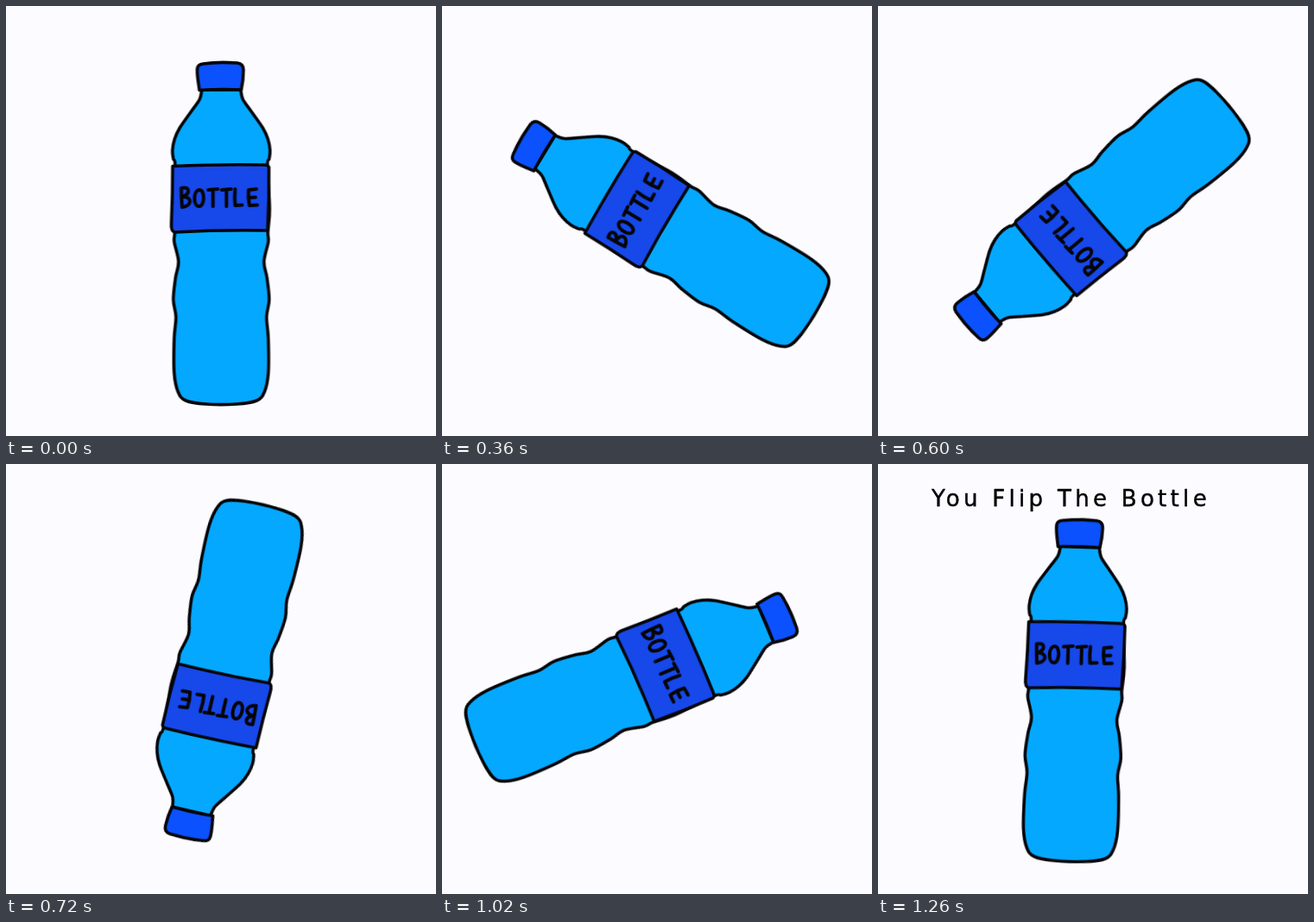
Write an HTML page that moves like this. It is 498x498 px and loops after 1320 ms.

```html
<!DOCTYPE html>
<html lang="en">
<head>
<meta charset="utf-8">
<title>Bottle flip</title>
<style>
  html, body { margin: 0; width: 100%; height: 100%; overflow: hidden; background: #fcfbff; }
  svg { display: block; width: 100vw; height: 100vh; }
  path { stroke: #050508; stroke-width: 3.6; stroke-linecap: round; stroke-linejoin: round; }
  #letters path { fill: none; stroke-width: 4; }
  #caption {
    font: 26px "DejaVu Sans", sans-serif;
    letter-spacing: 4.3px;
    stroke: #000; stroke-width: .4; stroke-linejoin: round;
    opacity: 0;
  }
</style>
</head>
<body>
<svg viewBox="0 0 498 498">
  <text id="caption" x="62" y="48.5">You Flip The Bottle</text>
  <g id="bottle">
    <g transform="translate(-249.5 -263)">
      <path id="body" fill="#05a8ff"/>
      <path fill="#0b51fd" d="M224 97.500 C223 89 221 81 221.500 73 Q222 67.500 228 67 C241 65 254 65 268 66 Q275 67 275 74 C275 82 274 90 272.500 97 Q248 96 224 97.500Z"/>
      <path fill="#1648ea" d="M193 185.500 Q249 183 298 184 Q304 184 304.500 187 Q305 223 303 260 Q249 259 195 262 Q191 260 191.500 253 Q193 219 193 185.500Z"/>
      <g id="letters"></g>
    </g>
  </g>
</svg>
<script>
const STEP = 60, COUNT = 22, CAPTION_AT = 20, AXIS = 249.3;
const $ = id => document.getElementById(id);

// Smooth closed path through a few points
function curve(p) {
  let d = 'M' + p[0];
  for (let i = 0; i < p.length - 1; i++) {
    const a = p[i - 1] || p[i], b = p[i], c = p[i + 1], e = p[i + 2] || c;
    const c1 = b.map((v, k) => v + (c[k] - a[k]) / 6);
    const c2 = c.map((v, k) => v - (e[k] - b[k]) / 6);
    d += `C${c1} ${c2} ${c}`;
  }
  return d + 'Z';
}

// Half width and height down one side, mirrored for the other
const profile = '22.5,97 25,108 34,121 48,141 54,154 56.5,167 55.5,177 53.5,185 56,235 ' +
  '54,262 54.5,273 49.5,296 53,315 55.5,340 52.5,360 54.5,385 54.5,425 50,447 41,457 18,461';
const side = profile.split(' ').map(s => s.split(',').map(Number));
$('body').setAttribute('d', curve([
  ...side.map(([w, y]) => [AXIS - w, y]),
  ...side.map(([w, y]) => [AXIS + w, y]).reverse()
]));

const glyphs = {
  B: 'M0-1Q0 10 1 21M0-1C9-4 12 5 1 9C13 8 13 20 1 21',
  O: 'M5 1C-2 2-2 20 5 20C12 20 12 0 5 1',
  T: 'M0 1L11 0M5.500 1V20',
  L: 'M0 0Q-1 10 0 19L8 18.500',
  E: 'M9 0L0 1Q-1 10 1 19L10 18.500M0 10L8 9.500'
};
$('letters').innerHTML = [...'BOTTLE'].map((c, i) =>
  `<path d="${glyphs[c]}" transform="translate(${203 + i * 15.6} 212)"/>`).join('');

// Key poses: step, centre x, centre y, angle
const poses = [
  [0, 249.5, 263, 0],
  [2, 258, 253, -8],
  [4, 266.3, 263, -25.7],
  [8, 254.5, 246, -94.8],
  [12, 252, 240.5, -167],
  [15, 237.3, 236.5, -234.7],
  [18, 217.8, 256.5, -318],
  [21, 228.5, 262, -358.1]
];

// Rate of change at a pose; at rest on both ends
function slope(i, k) {
  const a = poses[i - 1], b = poses[i + 1];
  return a && b ? (b[k] - a[k]) / (b[0] - a[0]) : 0;
}

function poseAt(n) {
  let i = 0;
  while (i < poses.length - 2 && n >= poses[i + 1][0]) i++;
  const a = poses[i], b = poses[i + 1], h = b[0] - a[0], t = (n - a[0]) / h, u = 1 - t;
  return [1, 2, 3].map(k =>
    u * u * (1 + 2 * t) * a[k] + t * t * (3 - 2 * t) * b[k] +
    h * t * u * (u * slope(i, k) - t * slope(i + 1, k)));
}

function play(el, styleAt) {
  const keys = Array.from({ length: COUNT + 1 }, (_, n) =>
    ({ ...styleAt(Math.min(n, COUNT - 1)), offset: n / COUNT, easing: 'step-end' }));
  el.animate(keys, { duration: STEP * COUNT, iterations: Infinity });
}

play($('bottle'), n => {
  const [x, y, angle] = poseAt(n);
  return { transform: `translate(${x}px, ${y}px) rotate(${angle}deg)` };
});
play($('caption'), n => ({ opacity: n >= CAPTION_AT ? 1 : 0 }));
</script>
</body>
</html>
```
